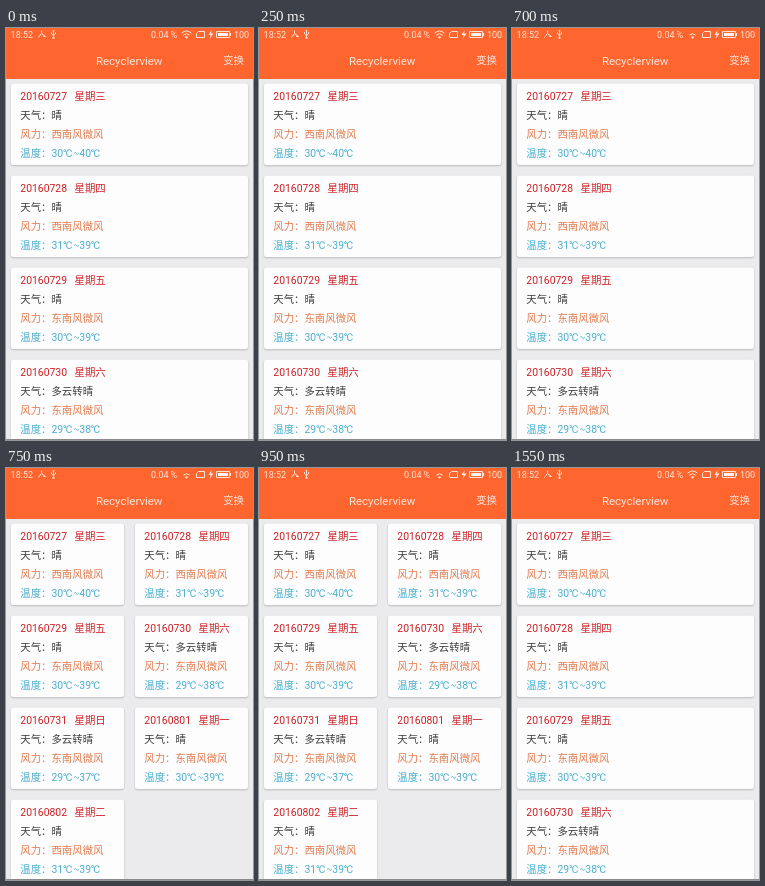
Write an HTML page with a canvas that moves like this. It is 247x412 px and loops after 2100 ms.

```html
<!DOCTYPE html>
<html lang="zh-CN">
<head>
<meta charset="utf-8">
<style>
  html, body { margin: 0; width: 100%; height: 100%; overflow: hidden; }
  canvas { display: block; width: 247px; height: 412px; }
</style>
</head>
<body>
<canvas></canvas>
<script>
const W = 247, H = 412, LOOP = 2100;
const GRID_START = 750, GRID_END = 1350, WIFI_DIM = 550;
const FONT = 'Roboto, "Noto Sans CJK SC", "Noto Sans CJK", sans-serif';
const CJK = '"Noto Sans CJK SC", "Noto Sans CJK", sans-serif';
const ORANGE = '#ff662f', PALE = '#ffe3d8';
const RED = '#cb1f24', DARK = '#3c3c3c', RUST = '#e17a4d', BLUE = '#4aafd0';

const days = [
  ['20160727', '三', '晴', '西南', 30, 40],
  ['20160728', '四', '晴', '西南', 31, 39],
  ['20160729', '五', '晴', '东南', 30, 39],
  ['20160730', '六', '多云转晴', '东南', 29, 38],
  ['20160731', '日', '多云转晴', '东南', 29, 37],
  ['20160801', '一', '晴', '东南', 30, 39],
  ['20160802', '二', '晴', '西南', 31, 39],
];

const canvas = document.querySelector('canvas');
const scale = window.devicePixelRatio || 1;
canvas.width = W * scale;
canvas.height = H * scale;
const c = canvas.getContext('2d');
c.scale(scale, scale);

function text(str, x, y, color, size = 10.4, family = FONT, align = 'left') {
  c.font = `${size}px ${family}`;
  c.textAlign = align;
  c.fillStyle = color;
  c.fillText(str, x, y);
}

function stroke(path, color = PALE, width = 1) {
  c.strokeStyle = color;
  c.lineWidth = width;
  c.stroke(new Path2D(path));
}

function fill(path, color = PALE) {
  c.fillStyle = color;
  c.fill(new Path2D(path));
}

function card([date, weekday, sky, wind, low, high], x, y, width) {
  c.save();
  c.shadowColor = 'rgba(0,0,0,.26)';
  c.shadowBlur = 2 * scale;
  c.shadowOffsetY = 0.7 * scale;
  c.fillStyle = '#fdfdfd';
  c.beginPath();
  c.roundRect(x, y + 0.5, width, 81.5, 2.5);
  c.fill();
  c.restore();

  const left = x + 9.3, value = left + 31.2;
  text(date, left, y + 17, RED);
  text('星期' + weekday, left + 54.2, y + 17, RED);
  text('天气：' + sky, left, y + 36, DARK);
  text(`风力：${wind}风微风`, left, y + 55, RUST);
  text('温度：', left, y + 74, BLUE);
  text(low + '℃', value, y + 74, BLUE);
  text('~', value + 22, y + 74, BLUE, 10.4, CJK);
  text(high + '℃', value + 27.8, y + 74, BLUE);
}

function wifi(dim) {
  if (!dim) stroke('M175.5 5.2Q180.5 .8 185.5 5.2');
  stroke('M177.2 7.2Q180.5 4.2 183.8 7.2');
  fill('M178.8 8.9Q180.5 7.4 182.2 8.9L180.5 10.8Z');
}

function header(dim) {
  c.fillStyle = ORANGE;
  c.fillRect(0, 0, W, 51);

  text('18:52', 4.6, 9.5, PALE, 9);
  stroke('M35.5 2.5V5.5L32.5 9.5M35.5 5.5L39.5 8.5H37');
  stroke('M47.5 2V10M45.5 4V6L47.5 7.5L49.5 6V4', PALE, 0.9);
  fill('M46.3 3.2L47.5 1.5L48.7 3.2ZM46.5 9H48.5V10.8H46.5Z');
  text('0.04', 145, 9.5, PALE, 9);
  text('%', 164.5, 9.5, PALE, 9);
  wifi(dim);
  stroke('M190.5 5.5L192.5 3.5H198.5V9.5H190.5Z');
  fill('M205.5 2L202.5 7H204.6L203.6 11L207.5 5.5H205.2Z');
  stroke('M210.5 3.5H223.5V9.5H210.5Z');
  fill('M212 5H222V8H212ZM224 5H225V8H224Z', '#fff4ef');
  text('100', 228, 9.5, PALE, 9);

  text('Recyclerview', 123.2, 37, PALE, 11.5, FONT, 'center');
  text('变换', 217.2, 36, PALE);
}

function draw(now) {
  const t = now % LOOP;
  const grid = t >= GRID_START && t < GRID_END;
  const columns = grid ? 2 : 1;

  c.fillStyle = '#ebeaec';
  c.fillRect(0, 0, W, H);
  days.forEach((day, i) => {
    const y = 55 + 92 * Math.floor(i / columns);
    if (y < H) card(day, 5 + 124 * (i % columns), y, grid ? 113 : 237);
  });
  header(t >= WIFI_DIM && t < GRID_END);

  c.fillStyle = '#8a8a8a';
  c.fillRect(0, H - 1, W, 1);
}

const start = performance.now();
function frame() {
  draw(performance.now() - start);
  requestAnimationFrame(frame);
}
frame();
</script>
</body>
</html>
```
